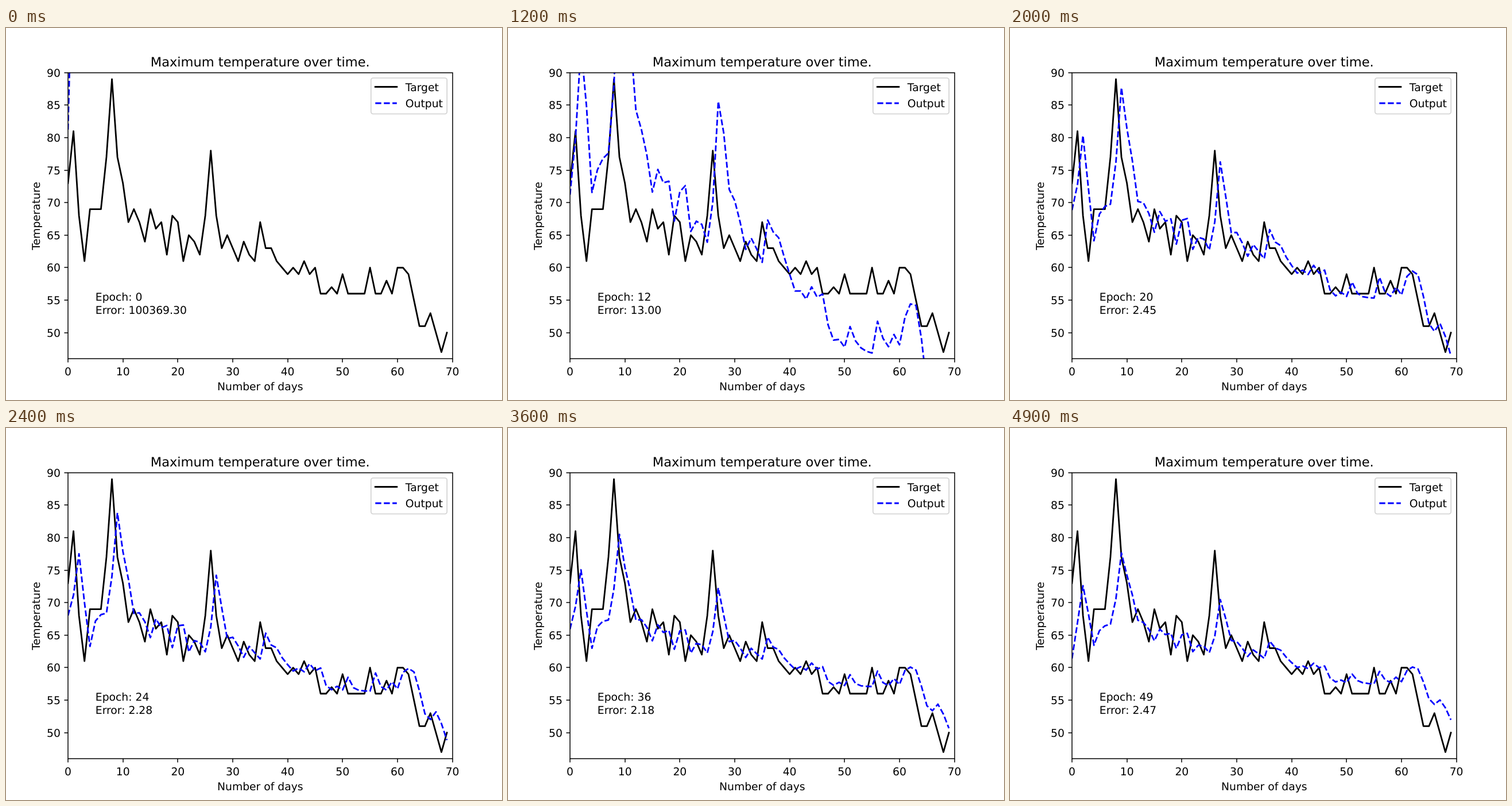
An HTML page for the animation above (5000 ms loop, 864 by 648 pixels).

```html
<!DOCTYPE html>
<html lang="en">
<head>
<meta charset="utf-8">
<title>Maximum temperature over time</title>
<style>
  html, body { margin: 0; width: 100%; height: 100%; overflow: hidden; background: #fff; }
  svg { display: block; width: 864px; height: 648px; }
  text { font: 18.75px "DejaVu Sans", sans-serif; fill: #000; text-rendering: geometricPrecision; }
  .title { font-size: 22.5px; }
  .mid { text-anchor: middle; }
  .end { text-anchor: end; }
  .line { fill: none; stroke-width: 2.8125; stroke-linejoin: round; }
  .target { stroke: #000; stroke-linecap: square; }
  .output { stroke: #00f; stroke-dasharray: 10.41 4.5; }
  .axis { fill: none; stroke: #000; stroke-width: 1.5; }
</style>
</head>
<body>
<svg viewBox="0 0 864 648">
  <clipPath id="plot"><rect x="108" y="77.76" width="669.6" height="498.24"/></clipPath>
  <g clip-path="url(#plot)">
    <path id="target" class="line target"/>
    <path id="output" class="line output"/>
  </g>
  <path id="ticks" class="axis"/>
  <rect class="axis" x="108" y="78" width="670" height="498"/>
  <g id="labels"></g>
  <text class="title mid" x="442.8" y="67">Maximum temperature over time.</text>
  <text class="mid" x="442.8" y="631">Number of days</text>
  <text class="mid" transform="translate(59 327.3) rotate(-90)">Temperature</text>
  <text id="epoch" x="155.8" y="475"></text>
  <text id="error" x="155.8" y="498"></text>
  <rect x="635.8" y="87.1" width="132.4" height="62.5" rx="3.75"
        fill="#fff" fill-opacity=".8" stroke="#ccc" stroke-opacity=".8" stroke-width="1.875"/>
  <path class="line target" d="M643.3 102.5h37.5"/>
  <path class="line output" d="M643.3 131h37.5"/>
  <text x="695.8" y="110">Target</text>
  <text x="695.8" y="138">Output</text>
</svg>
<script>
const STEP = 100, EPOCHS = 50;
const H = 648;
const $ = id => document.getElementById(id);
const px = day => 108 + day * 669.6 / 70;
const py = temp => 77.76 + (90 - temp) * 498.24 / 44;

// Daily readings
const target = [
  73, 81, 68, 61, 69, 69, 69, 77, 89, 77, 73, 67, 69, 67, 64, 69, 66, 67, 62, 68,
  67, 61, 65, 64, 62, 68, 78, 68, 63, 65, 63, 61, 64, 62, 61, 67, 63, 63, 61, 60,
  59, 60, 59, 61, 59, 60, 56, 56, 57, 56, 59, 56, 56, 56, 56, 60, 56, 56, 58, 56,
  60, 60, 59, 55, 51, 51, 53, 50, 47, 50
];

// The output follows the previous reading and its own previous value;
// both weights settle along one sigmoid, then drift slowly
function predict(epoch) {
  const shock = Math.exp(-2 * epoch);
  const learn = 1 / (1 + Math.exp((epoch - 12.83) / 4.05));
  const drift = (epoch / 49) ** 3.65;
  const weight = 0.645 + 1.1 * learn - 0.166 * drift + 1.37 * shock;
  const feedback = 0.21 + 0.505 * learn + 0.12 * drift + 0.5 * shock;
  const level = 61.3 + 2.15 * learn;

  let input = 81, output = 33;
  return target.map(reading => {
    output = level + weight * (input - level) + feedback * (output - level);
    input = reading;
    return output;
  });
}

// Key points of the error, joined on a log scale
const errors = [[0, 100369.3], [2, 430], [8, 35.1], [12, 13], [20, 2.45], [28, 2.12], [36, 2.18], [49, 2.47]];

function errorAt(epoch) {
  const next = Math.max(1, errors.findIndex(point => point[0] >= epoch));
  const [e0, v0] = errors[next - 1], [e1, v1] = errors[next];
  return v0 * (v1 / v0) ** ((epoch - e0) / (e1 - e0));
}

// Cut the line at the stage edges so that the dashes restart on re-entry
function linePath(temps) {
  const top = -1, bottom = H + 1;
  let d = "", joined = false;
  for (let i = 1; i < temps.length; i++) {
    const x = px(i - 1), y = py(temps[i - 1]);
    const dx = px(i) - x, dy = py(temps[i]) - y;
    let from = 0, to = 1;
    if (dy) {
      const a = (top - y) / dy, b = (bottom - y) / dy;
      from = Math.max(0, Math.min(a, b));
      to = Math.min(1, Math.max(a, b));
    } else if (y < top || y > bottom) {
      to = 0;
    }
    if (from >= to) { joined = false; continue; }
    const at = s => (x + dx * s).toFixed(2) + " " + (y + dy * s).toFixed(2);
    if (!joined || from > 0) d += "M" + at(from);
    d += "L" + at(to);
    joined = to === 1;
  }
  return d;
}

function drawAxes() {
  let ticks = "", labels = "";
  for (let day = 0; day <= 70; day += 10) {
    ticks += `M${Math.round(px(day))} 576v6.56`;
    labels += `<text class="mid" x="${px(day)}" y="605">${day}</text>`;
  }
  for (let temp = 50; temp <= 90; temp += 5) {
    const y = Math.round(py(temp));
    ticks += `M108 ${y}h-6.56`;
    labels += `<text class="end" x="94.9" y="${y + 7}">${temp}</text>`;
  }
  $("ticks").setAttribute("d", ticks);
  $("labels").innerHTML = labels;
  $("target").setAttribute("d", linePath(target));
}

let shown = -1;
function draw(time) {
  const epoch = Math.floor(time / STEP) % EPOCHS;
  if (epoch === shown) return;
  shown = epoch;
  $("output").setAttribute("d", linePath(predict(epoch)));
  $("epoch").textContent = "Epoch: " + epoch;
  $("error").textContent = "Error: " + errorAt(epoch).toFixed(2);
}

drawAxes();
draw(0);
const start = performance.now();
function tick() {
  draw(performance.now() - start);
  requestAnimationFrame(tick);
}
requestAnimationFrame(tick);
</script>
</body>
</html>
```
